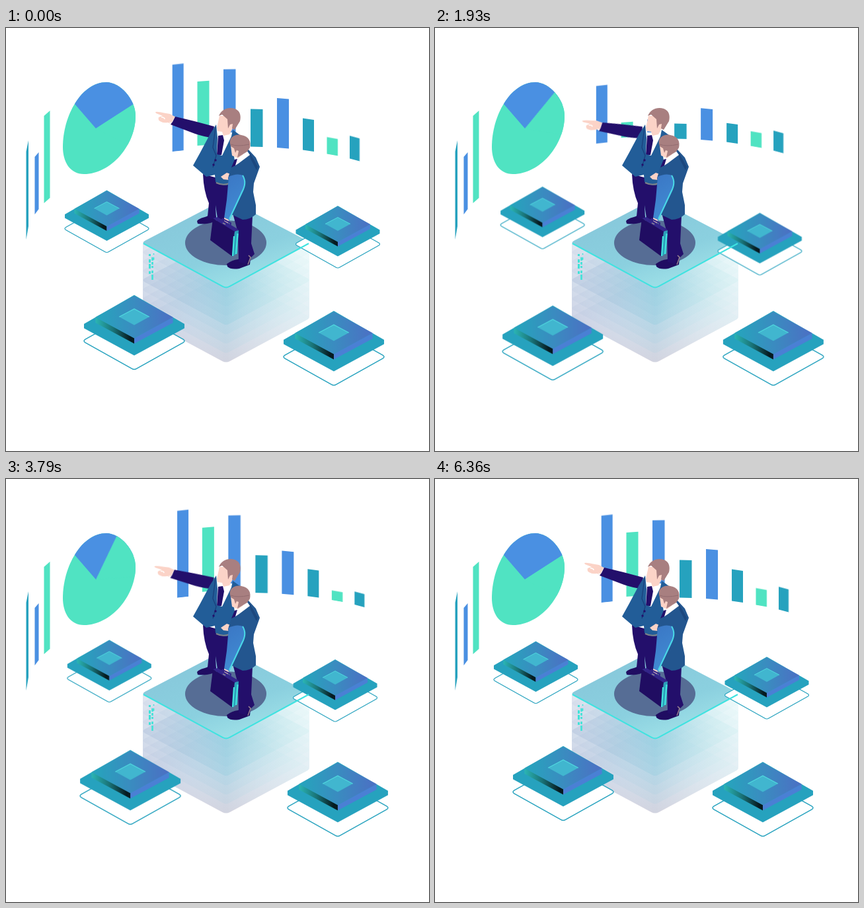
Recreate the animation shown at these times as an HTML page. Size 640 by 640 pixels, loop 6.43 s.

```html
<!DOCTYPE html>
<html lang="en">
<head>
<meta charset="utf-8">
<title>Business analytics</title>
<style>
  html, body { margin: 0; width: 100%; height: 100%; overflow: hidden; background: #fff; }
  svg { display: block; width: 100%; height: 100%; }

  .sway, .pie-cover, .chart, .bar {
    animation: 6430ms cubic-bezier(.333, 0, .667, 1) infinite;
  }
  .sway { animation-name: sway; }
  .arm { transform-origin: 316px 157px; }
  .pie-cover { animation-name: cover; transform-origin: 136px 152px; }
  .chart { animation-name: drift; }
  .bar { transform-origin: 0 0; }
  .wave1 { animation-name: wave1; }
  .wave2 { animation-name: wave2; }
  .wave3 { animation-name: wave3; }
  .wave4 { animation-name: wave4; }

  @keyframes sway {
    0%, 49.46%, 98.91%, 100% { transform: none; }
    24.73%, 74.18% { transform: var(--to); }
  }
  @keyframes cover {
    0%, 98.91%, 100% { transform: rotate(0deg); }
    56% { transform: rotate(-32deg); }
  }
  @keyframes drift {
    0%, 72.8%, 100% { transform: translate(0, 0); }
    23.3% { transform: translate(-12px, -12px); }
    48.8% { transform: translate(12px, -12px); }
  }
  @keyframes wave1 {
    0%, 46.7%, 100% { transform: scaleY(1); }
    24.4% { transform: scaleY(var(--low)); }
  }
  @keyframes wave2 {
    0%, 12.4%, 57.5%, 100% { transform: scaleY(1); }
    37.3% { transform: scaleY(var(--low)); }
  }
  @keyframes wave3 {
    0%, 18.7%, 64.6%, 100% { transform: scaleY(1); }
    42.8% { transform: scaleY(var(--low)); }
  }
  @keyframes wave4 {
    0%, 23.3%, 73%, 100% { transform: scaleY(1); }
    48.4% { transform: scaleY(var(--low)); }
  }
</style>
</head>
<body>
<svg viewBox="0 0 640 640">
  <defs>
    <linearGradient id="plate"><stop offset=".05" stop-color="#27a3bd"/><stop offset=".5" stop-color="#3a8cc0"/><stop offset="1" stop-color="#4c6fc4"/></linearGradient>
    <linearGradient id="shade"><stop stop-color="#2bb5b4"/><stop offset=".45" stop-color="#1a7478"/><stop offset=".9" stop-color="#061a20"/></linearGradient>
    <linearGradient id="column" x2="0" y2="1"><stop stop-color="#f1f9fb"/><stop offset=".32" stop-color="#dcecf4"/><stop offset=".62" stop-color="#dbe3ef"/><stop offset="1" stop-color="#dbd5e0"/></linearGradient>
    <linearGradient id="haze"><stop stop-color="#b9b6d4" stop-opacity=".3"/><stop offset=".5" stop-color="#fff" stop-opacity="0"/><stop offset="1" stop-color="#f2fffc" stop-opacity=".45"/></linearGradient>
    <linearGradient id="glass" x1=".2" x2=".8" y2="1"><stop stop-color="#86c6da"/><stop offset=".6" stop-color="#8bd0df"/><stop offset="1" stop-color="#a5e6ea"/></linearGradient>
    <linearGradient id="layer"><stop stop-color="#8aa6cd"/><stop offset=".5" stop-color="#86c8dc"/><stop offset="1" stop-color="#a3dfe2"/></linearGradient>
    <linearGradient id="sleeve" x2=".3" y2="1"><stop stop-color="#3a76c4"/><stop offset="1" stop-color="#418bd3"/></linearGradient>

    <clipPath id="disc"><path d="M152 82C172 82 196 107 196 133 196 178 158 221 118 221 97 221 86 203 86 180 86 133 114 82 152 82Z"/></clipPath>
    <path id="sheet" d="M210 322L329 260Q333 258 337 260L456 322Q461 325 456 328L338 391Q333 394 328 391L210 328Q205 325 210 322Z"/>

    <g id="tile">
      <path d="M-62 56L-3 23Q0 21 3 23L62 56Q65 58 62 60L3 93Q0 95-3 93L-62 60Q-65 58-62 56Z" fill="#fff" stroke="#26a2be" stroke-width="1.2"/>
      <path d="M-63.5 36.5L0 0 63.5 36.5V42L0 76.5-63.5 42Z" fill="#26a2be"/>
      <path d="M-49 28L0 54.5V61.5L-49 35Z" fill="url(#shade)"/>
      <path d="M49 28L0 54.5V61.5L49 35Z" fill="#4a80d4"/>
      <path d="M0 1L49 28 0 54.5-49 28Z" fill="url(#plate)"/>
      <path d="M0 17.5L19 27.5 0 38-19 27.5Z" fill="#41b6cf"/>
      <path d="M-19 27.5L0 17.5 19 27.5" fill="none" stroke="#50d8df"/>
    </g>
  </defs>

  <g fill="#26a2be">
    <path d="M30.5 187L34 170V300L30.5 320Z"/>
    <path d="M43.5 195L49.5 188V274L43.5 282Z" fill="#4a90e2"/>
    <path d="M57.5 133L66.5 125V257L57.5 265Z" fill="#50e3c2"/>
  </g>

  <g clip-path="url(#disc)">
    <path d="M80 75H200V225H80Z" fill="#50e3c2"/>
    <path d="M136 152L71 77V50H220V97.9Z" fill="#4a90e2"/>
    <path class="pie-cover" d="M136 152L236 87.5V203Z" fill="#50e3c2"/>
  </g>

  <g class="chart" id="chart"></g>

  <g class="sway" style="--to:translate(11.5px,-6.3px)"><use href="#tile" x="152.5" y="245.5"/></g>

  <path d="M207 325V436Q207 439 210 441L327 504Q333 507 339 504L456 441Q459 439 459 436V325L333 393Z" fill="url(#column)"/>
  <g id="layers" fill="url(#layer)"></g>
  <path d="M207 325V436Q207 439 210 441L327 504Q333 507 339 504L456 441Q459 439 459 436V325L333 393Z" fill="url(#haze)"/>
  <use href="#sheet" fill="url(#glass)"/>

  <g class="sway" style="--to:translate(-12px,12px)"><use href="#tile" x="502" y="269"/></g>
  <g class="sway" style="--to:translate(-18px,18px)"><use href="#tile" transform="translate(194 404) scale(1.197)"/></g>
  <g class="sway" style="--to:translate(18px,0)"><use href="#tile" transform="translate(496 428) scale(1.197)"/></g>

  <path d="M208 326L328 391Q333 394 338 391L458 326" fill="none" stroke="#3fe3e0" stroke-width="2"/>
  <g fill="none" stroke="#3fe3d8" stroke-width="3">
    <path d="M217.5 342v3m0 5v5m0 2v7m0 4v4"/>
    <path d="M221.5 347v5m0 2v4m0 2v3m0 4v4m0 2v8" stroke-width="2.6"/>
    <path d="M223.5 341v2m0 4v4" stroke-width="1.6"/>
  </g>
  <ellipse cx="332.5" cy="325" rx="61.5" ry="34" fill="#566d95"/>

  <!-- pointing man -->
  <g class="sway arm" style="--to:rotate(-9.5deg)">
    <path d="M226 127Q229 126 239 128.500L248 130 257 135 252 146 245 143Q238 144 235 142 229 140 231 135L237 133 227 129Z" fill="#fbd3c7"/>
    <path d="M235 135q5 0 5 3" fill="none" stroke="#fff" stroke-width="1.500"/>
    <path d="M256 133L253 144 247 142 249 146Z" fill="#fff"/>
    <path d="M256 134L285 141 315 149 312 166Q301 165 286 160L249 146 252 142Z" fill="#230f6b"/>
  </g>
  <path d="M289 292C294 286 303 287 307 283L318 284 316 292C308 297 296 297 290 296Z" fill="#200d62"/>
  <path d="M298 221L338 232 335 294 320 288 317 268 318 288Q310 291 305 285L307 265Q299 247 298 221Z" fill="#230f6b"/>
  <path d="M321 158L343 158 342 184 326 194Z" fill="#fff"/>
  <path d="M321 163L328 162 330 170 326 192 319 192Z" fill="#230f6b"/>
  <path d="M318 146L320 166 319 191 327 193 341 164 343 154 354 162 351 200 342 236Q328 241 317 233L316 222 303 225 283 208 293 190 309 160Z" fill="#225d98"/>
  <path d="M317 149L313 181 318 193 313 211" fill="none" stroke="#193f7b" stroke-width="1.200"/>
  <g fill="#230f6b"><circle cx="317" cy="200" r="1.700"/><circle cx="314" cy="207" r="1.700"/></g>
  <path d="M325 225L334 219 340 221 338 230 329 229Z" fill="#fbd3c7"/>
  <path d="M318 234Q328 239 338 235" fill="none" stroke="#7e8288" stroke-width="2"/>
  <path d="M323 133L319 151 320 156 327 157 329 163 338 161 345 148 340 133Z" fill="#fbd3c7"/>
  <path d="M322 133C326 123 336 119 346 122 354 125 356 132 354 141L346 154 342 152 343 145 339 146 336 152 335 138 327 131Z" fill="#a87f80"/>

  <!-- man with briefcase -->
  <path d="M334 357Q342 351 351 350L365 342 370 347 369 358Q361 361 353 364 340 366 335 361Z" fill="#200d62"/>
  <path d="M343 280L373 284 371 326 376 342 371 347 366 345 363 357 352 354 351 310Z" fill="#230f6b"/>
  <path d="M367 344L370 347 366 358" fill="none" stroke="#97818f" stroke-width="1.500"/>
  <path d="M366 183L378 196 384 210 375 235 374 248 378 268 378 282Q369 290 358 290L341 282 340 249 336 227 341 210 353 200Z" fill="#23568f"/>
  <path d="M368 187L381 210 379 215 370 198Z" fill="#1c477e"/>
  <path d="M345 194L364 185 369 192 353 204 347 208Z" fill="#fff"/>
  <path d="M346 199L350 198 347 208 341 211Z" fill="#230f6b"/>
  <path d="M337 225Q349 219 359 223 364 231 359 247L347 272 337 292 330 288 334 260Z" fill="url(#sleeve)"/>
  <path d="M358 223Q365 234 357 248L338 289" fill="none" stroke="#49d9e6" stroke-width="2"/>
  <path d="M340 178L342 193 351 197 359 191 358 178Z" fill="#fbd3c7"/>
  <path d="M339 175C337 166 346 160 356 162 368 164 371 172 369 181L365 187 350 196 352 186 349 185 347 189 345 182 340 179Z" fill="#a87f80"/>
  <path d="M340 176Q350 180 368 176" fill="none" stroke="#936c70"/>

  <path d="M330 287L337 290 335 298 330 294Z" fill="#fbd3c7"/>
  <path d="M313 288L320 286 352 305 345 309Z" fill="#33258a"/>
  <path d="M313 288L346 308 343 346 309 321Z" fill="#200d62"/>
  <path d="M346 308L352 306 350 341 342 346Z" fill="#2c9fba"/>
  <path d="M345 315L343 345M350.500 311L348 342" fill="none" stroke="#43e4df" stroke-width="2.200"/>
  <path d="M323 292L328 289 340 295 339 303" fill="none" stroke="#33258a" stroke-width="2"/>
  <path d="M328 295l4 2" stroke="#8b8795" stroke-width="1.500"/>
</svg>
<script>
  const blue = '#4a90e2', green = '#50e3c2', teal = '#26a2be';
  // x, base y, width, height, slope in degrees, lowest scale, wave, colour
  const bars = [
    [251.7, 187, 17, 131.5, -6, .6, 1, blue],
    [289.5, 178, 18, 97, -4, .04, 2, green],
    [329, 179, 18.5, 116.5, -1, .05, 2, blue],
    [370, 179.5, 18.5, 57, 1.500, .25, 2, teal],
    [410, 181, 18, 75, 5, .2, 3, blue],
    [449, 184.5, 17, 48, 8, .12, 3, teal],
    [485.5, 190.5, 16.5, 25.5, 10, .3, 4, green],
    [520, 197.5, 15, 34.5, 15, .3, 4, teal]
  ];
  document.getElementById('chart').innerHTML = bars.map(([x, y, w, h, slope, low, wave, fill]) =>
    `<g transform="translate(${x} ${y}) skewY(${slope})">
      <rect class="bar wave${wave}" style="--low:${low}" y="${-h}" width="${w}" height="${h}" fill="${fill}"/>
    </g>`).join('');

  document.getElementById('layers').innerHTML = Array.from({ length: 8 }, (_, i) => {
    const y = 113 - i * 14.1;
    return `<use href="#sheet" y="${y}" opacity="${i === 4 ? .28 : .12}"/>`;
  }).join('');
</script>
</body>
</html>
```
